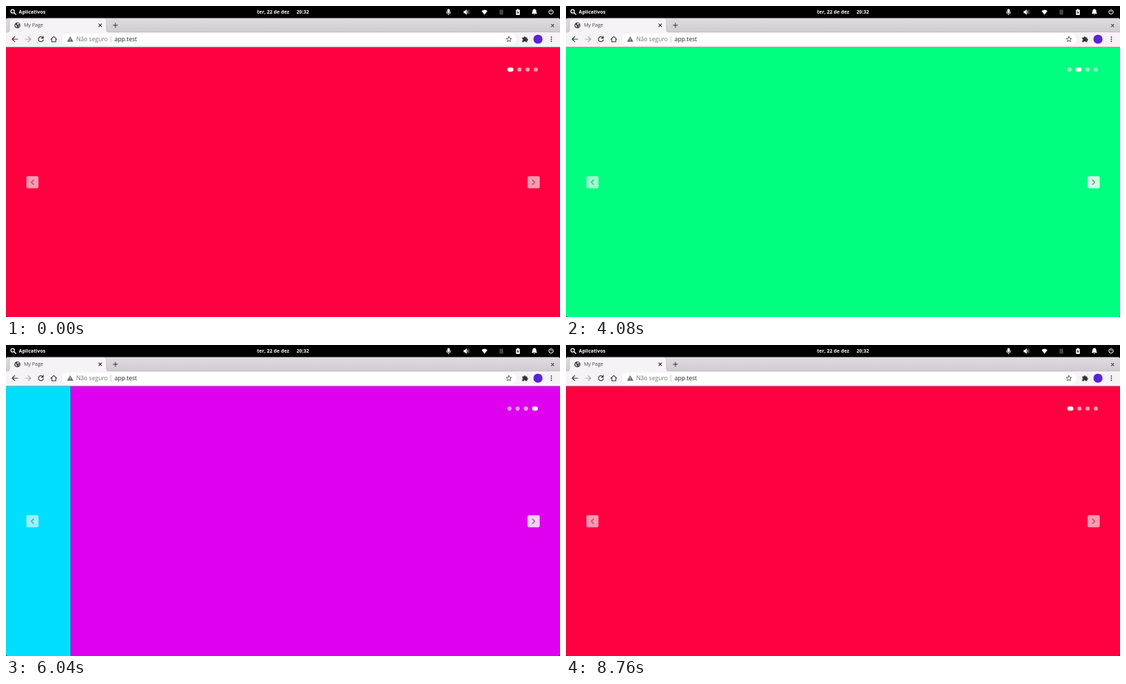
Write an HTML page that moves like this. It is 800 by 450 pixels and loops after 8.8 s.

```html
<!DOCTYPE html>
<html lang="pt-BR">
<head>
<meta charset="utf-8">
<title>My Page</title>
<style>
  html, body { margin: 0; width: 100%; height: 100%; overflow: hidden; background: #000; }
  svg { display: block; width: 100vw; height: 100vh; }
  text { font-family: "Open Sans", "Noto Sans", sans-serif; white-space: pre; }
  .bold { font-weight: 700; font-size: 7.03px; fill: #fff; }
  .url { font-size: 8.5px; }
  .line { fill: none; stroke-linecap: round; stroke-linejoin: round; }
</style>
</head>
<body>
<svg viewBox="0 0 800 450">
  <defs>
    <linearGradient id="strip" x2="0" y2="1">
      <stop stop-color="#dfdbdf"/><stop offset="1" stop-color="#d0cbd0"/>
    </linearGradient>
    <clipPath id="page"><path d="M0 59.5H800V448.5L798.5 450H1.5L0 448.5Z"/></clipPath>
    <g id="button">
      <rect width="17.5" height="17.5" rx="2" fill="#fff"/>
      <path class="line" d="M10.3 5.6L7.2 8.75L10.3 11.9" stroke="#858585" stroke-width="1.5"/>
    </g>
  </defs>

  <!-- system bar -->
  <g stroke="#fff" class="line" stroke-width="1.3">
    <circle cx="9.6" cy="7.7" r="2.5"/><path d="M11.6 9.7L14.2 12.3"/>
  </g>
  <text class="bold" x="18.6" y="11.2">Aplicativos</text>
  <text class="bold" x="362.5" y="11.2">ter, 22 de dez</text>
  <text class="bold" x="419.5" y="11.2">20:32</text>
  <g fill="#fff">
    <rect x="637.4" y="4.2" width="3.4" height="6" rx="1.7"/>
    <path class="line" d="M636 8.2a3.1 3.1 0 0 0 6.2 0M639.1 11.3V13" stroke="#fff" stroke-width=".9"/>
    <path d="M660.8 7.2H662.6L665.4 4.7V13L662.6 10.5H660.8Z"/>
    <path class="line" d="M666.6 7.2q1.3 1.6 0 3.2" stroke="#fff" stroke-width=".9"/>
    <path class="line" d="M668 5.7q2.6 3.1 0 6.2" stroke="#777" stroke-width=".9"/>
    <path d="M686.8 7.2Q691 4 695.2 7.2L691 12.8Z"/>
    <rect x="712.6" y="5.4" width="5.4" height="7" fill="#444"/>
    <path d="M738 4.5h2.4v.9h1.5v7.6h-5.4V5.4H738Z"/>
    <path d="M739.7 6.5L737.6 9.6H739L738.6 12L740.8 8.9H739.4Z" fill="#000"/>
    <path d="M763 4.3q2.8.5 2.8 3.6 0 2.2 1.4 3.4H758.8q1.4-1.2 1.4-3.4 0-3.1 2.8-3.6ZM761.8 11.9H764.2L763 13.1Z"/>
    <path class="line" d="M785.1 6.2a3.1 3.1 0 1 0 3.8 0M787 4.8V8.2" stroke="#fff" stroke-width="1.1"/>
  </g>

  <!-- tab strip -->
  <path d="M0 38.5V20Q0 17.5 2.5 17.5H797.5Q800 17.5 800 20V38.5Z" fill="url(#strip)"/>
  <path d="M0 59.5V38H2Q5 38 5 35V21Q5 18 8 18H142Q145 18 145 21V35Q145 38 148 38H800V59.5Z" fill="#f6f3f7"/>
  <path class="line" d="M0 37.7H2Q5 37.7 5 35V21Q5 18 8 18H142Q145 18 145 21V35Q145 37.7 148 37.7H800" stroke="#b9b4ba" stroke-width=".6"/>
  <circle cx="16.5" cy="28" r="4.3" fill="#3c3f43"/>
  <path d="M13.3 26.8L15.7 28.4L15.4 30.2L16.7 31.4Q13.4 31 13.3 26.8ZM16.3 24.8L18.6 25L18.8 26.2L17.2 27.2L16 26.4ZM17.6 28.5L19.8 28.3L19 30.2Z" fill="#f6f3f7"/>
  <text x="26" y="30.4" font-size="7.05" fill="#45454a">My Page</text>
  <g class="line" stroke="#333">
    <path d="M134 25.8L138 29.8M138 25.8L134 29.8" stroke-width="1.2"/>
    <path d="M158 24.7V31.1M154.8 27.9H161.2" stroke-width="1"/>
    <path d="M787.7 26.6L790.9 29.8M790.9 26.6L787.7 29.8" stroke-width="1.1"/>
  </g>

  <!-- toolbar -->
  <rect x="81" y="39.8" width="656" height="16.6" rx="8.3" fill="#fff"/>
  <g class="line" stroke="#333" stroke-width="1.2">
    <path d="M16.7 48H9M12.6 44.3L8.9 48L12.6 51.7"/>
    <path d="M28 48H35.7M32.1 44.3L35.8 48L32.1 51.7" stroke="#aaa7ac"/>
    <path d="M53.2 45.8A3.6 3.6 0 1 0 53.9 48.8M53.8 43.9V46.6H51.1"/>
    <path d="M64.8 48.2L69 44.2L73.2 48.2M66.1 47.4V51.8H71.9V47.4" stroke-width="1.1"/>
    <path d="M726.2 44.2L727.3 46.8L730.1 47L728 48.9L728.6 51.6L726.2 50.2L723.8 51.6L724.4 48.9L722.3 47L725.1 46.8Z" stroke-width=".8"/>
  </g>
  <path d="M92.7 43.8L97.3 51.8H88.1Z" fill="#6a6a6e"/>
  <path d="M92.7 46.5V49M92.7 49.8V50.7" stroke="#fff" stroke-width=".9"/>
  <text class="url" x="101.4" y="51" fill="#77777b">Não seguro</text>
  <path d="M151.5 43.3V52.7" stroke="#c3c1c5" stroke-width=".8"/>
  <text class="url" x="156.8" y="51" fill="#252528">app.test</text>
  <path d="M745.5 45.6H747.8a1.3 1.3 0 0 1 2.6 0H752.5V47.6a1.3 1.3 0 0 1 0 2.6V52.3H750.3a1.3 1.3 0 0 0-2.6 0H745.5V50a1.3 1.3 0 0 0 0-2.5Z" fill="#333"/>
  <circle cx="768.2" cy="48" r="6.6" fill="#5a25d6"/>
  <g fill="#333"><circle cx="787.5" cy="45" r=".9"/><circle cx="787.5" cy="48" r=".9"/><circle cx="787.5" cy="51" r=".9"/></g>

  <!-- carousel -->
  <g clip-path="url(#page)"><g id="track"></g></g>
  <path d="M0 59.3H800" stroke="#c9c2ca" stroke-width=".5"/>
  <g id="dots" fill="#fff"></g>
  <use href="#button" x="29.4" y="246.3" opacity=".6"/>
  <use id="next" href="#button" transform="translate(770.7 246.3) scale(-1 1)"/>
</svg>
<script>
const LOOP = 8800, SLIDE_MS = 330, GAP = 5.8;
const colors = ['#ff0040', '#00ff80', '#00deff', '#de00ee'];
const moves = [[1886, 1], [4090, 2], [5844, 3], [7435, 0]]; // start time, slide shown next

const track = document.getElementById('track');
const dotBox = document.getElementById('dots');
const next = document.getElementById('next');

function addRect(parent, attrs) {
  const rect = document.createElementNS('http://www.w3.org/2000/svg', 'rect');
  for (const key in attrs) rect.setAttribute(key, attrs[key]);
  return parent.appendChild(rect);
}

colors.forEach((fill, i) => addRect(track, { x: i * 800, y: 59.5, width: 800, height: 391, fill }));
const dots = colors.map(() => addRect(dotBox, { y: 89, height: 6, rx: 3 }));

// The CSS "ease" curve: cubic-bezier(.25, .1, .25, 1)
function ease(x) {
  if (x <= 0) return 0;
  if (x >= 1) return 1;
  const curve = (a, b, s) => 3 * a * s * (1 - s) ** 2 + 3 * b * s * s * (1 - s) + s ** 3;
  let low = 0, high = 1;
  for (let i = 0; i < 24; i++) {
    const mid = (low + high) / 2;
    if (curve(.25, .25, mid) < x) low = mid; else high = mid;
  }
  return curve(.1, 1, low);
}

function draw(t) {
  let position = 0;
  let active = [1, 0, 0, 0];
  for (const [start, target] of moves) {
    const k = ease((t - start) / SLIDE_MS);
    position += (target - position) * k;
    active = active.map((a, i) => a + ((i === target) - a) * k);
  }
  track.setAttribute('transform', `translate(${-800 * position} 0)`);

  let right = 768.1;
  for (let i = dots.length - 1; i >= 0; i--) {
    const width = 6 + 2.7 * active[i];
    dots[i].setAttribute('x', right - width);
    dots[i].setAttribute('width', width);
    dots[i].setAttribute('opacity', .6 + .4 * active[i]);
    right -= width + GAP;
  }

  const hover = ease((t - 985) / 375) - ease((t - 8465) / 295);
  next.setAttribute('opacity', .6 + .2 * hover);
}

const begin = performance.now();
function frame() {
  draw((performance.now() - begin) % LOOP);
  requestAnimationFrame(frame);
}
frame();
</script>
</body>
</html>
```
